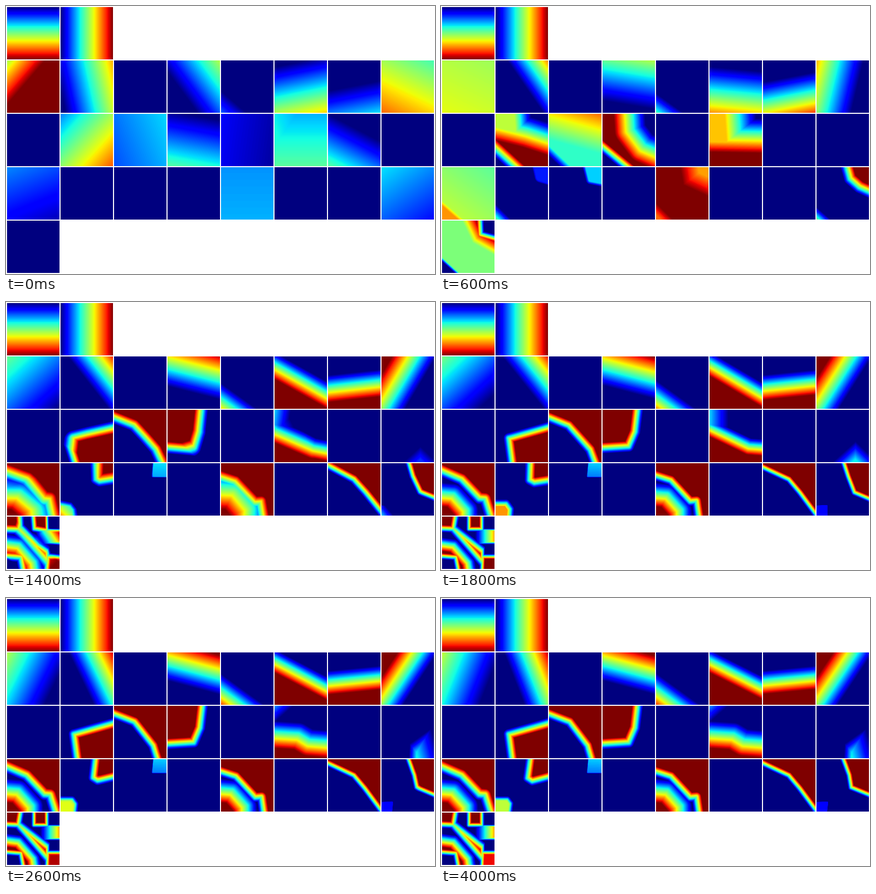
Recreate the animation shown at these times as a matplotlib script. Size 818x512 px, loop 4.2 s.

```python
import numpy as np
import matplotlib.pyplot as plt
from matplotlib.animation import FuncAnimation

WIDTH, HEIGHT, SIZE, GAP = 818, 512, 100, 2
FRAMES, INTERVAL = 21, 200
SETTLE = 3   # frames in which most of a change is done
X, Y = np.meshgrid(np.arange(SIZE) + .5, np.arange(SIZE) + .5)


# Fields give one unit's activation in percent; the colour map clips them.
def plane(top_left, top_right, bottom_left):
    return top_left + (top_right - top_left) * X / SIZE + (bottom_left - top_left) * Y / SIZE


def edge(width, *points):
    """Ramp of `width` pixels across a polyline, rising to the right of its direction."""
    path = np.array(points, float)
    for end, inner in ((0, 1), (-1, -2)):
        outward = path[end] - path[inner]
        path[end] += 300 * outward / np.hypot(*outward)
    best = np.full(X.shape, 1e9)
    signed = np.zeros(X.shape)
    for (x0, y0), (x1, y1) in zip(path, path[1:]):
        dx, dy = x1 - x0, y1 - y0
        length = np.hypot(dx, dy)
        t = np.clip(((X - x0) * dx + (Y - y0) * dy) / length ** 2, 0, 1)
        distance = np.hypot(X - x0 - t * dx, Y - y0 - t * dy)
        side = (dx * (Y - y0) - dy * (X - x0)) / length
        score = distance - 1e-3 * abs(side)   # settles ties at the corners
        signed = np.where(score < best, np.sign(side) * distance, signed)
        best = np.minimum(score, best)
    return np.clip(50 + 100 * signed / width, -60, 160)


def lowest(*fields):
    return np.min(np.broadcast_arrays(*fields), axis=0)


def highest(*fields):
    return np.max(np.broadcast_arrays(*fields), axis=0)


OFF = plane(-20, -20, -20)

# Each unit is a few poses by frame number; units without poses stay off.
units = {(0, 0): {0: plane(0, 0, 100)}, (0, 1): {0: plane(0, 100, 0)}}

# First hidden layer: one linear ramp per unit
units[1, 0] = {0: plane(55, 117, 108), 3: plane(57, 54, 63), 5: plane(43, 30, 28),
               9: plane(50, 22, 20), 20: plane(59, 6, 38)}
units[1, 1] = {0: plane(8, 73, -6), 3: plane(-22, 77, -90), 9: plane(-13, 90, -95),
               20: plane(-18, 95, -62)}
units[1, 3] = {0: plane(8, 57, -28), 3: plane(47, 57, -14), 20: plane(72, 108, -62)}
units[1, 4] = {0: plane(-30, -75, 22), 5: plane(-85, -180, 50), 20: plane(-56, -160, 87)}
units[1, 5] = {0: plane(-8, 5, 56), 3: plane(-10, -18, 76), 9: plane(20, -105, 232),
               20: plane(12, -102, 238)}
units[1, 6] = {0: plane(-33, -22, 24), 3: plane(-45, -24, 64), 20: plane(-78, -57, 145)}
units[1, 7] = {0: plane(55, 43, 80), 3: plane(72, -8, 53), 20: plane(142, 10, 54)}

# Second hidden layer: ramps bent where they cross the first layer's edges
units[2, 1] = {
    0: plane(25, 55, 52),
    3: lowest(highest(edge(60, (0, 20), (60, 35), (100, 48)),
                      lowest(58, edge(55, (40, 0), (43, 40)))),
              edge(26, (37, 100), (0, 66))),
    5: lowest(highest(edge(40, (0, 42), (50, 35), (100, 35)), plane(62, -12, 10)),
              edge(20, (17, 100), (0, 78))),
    9: edge(20, (31, 100), (25, 54), (100, 33)),
}
units[2, 2] = {
    0: plane(24, 34, 20),
    3: lowest(highest(plane(66, 80, 15), 41), edge(36, (46, 100), (0, 56))),
    5: edge(34, (94, 88), (62, 50), (40, 29), (0, 14)),
    9: edge(20, (87, 100), (78, 76), (37, 30), (0, 15)),
    20: edge(19, (80, 100), (73, 76), (39, 31), (0, 16)),
}
units[2, 3] = {
    0: lowest(plane(3, -5, 46), 44),
    3: lowest(edge(60, (51, 0), (53, 32), (77, 64), (100, 74)), edge(20, (45, 100), (0, 63))),
    5: lowest(edge(45, (55, 0), (53, 38), (62, 80)), edge(26, (45, 92), (0, 70))),
    9: edge(21, (67, 0), (62, 42), (50, 70), (0, 73)),
}
units[2, 4] = {0: plane(11, 4, 10), 3: OFF}
units[2, 5] = {
    0: highest(plane(36, 22, 42), plane(30, 30, 46)),
    3: highest(edge(66, (0, 40), (100, 42)), lowest(70, edge(85, (46, 0), (48, 30)))),
    5: highest(plane(34, -102, -15),
               lowest(plane(-25, -41, 74), edge(60, (24, 52), (84, 94)))),
    9: highest(plane(34, -60, 34), edge(32, (0, 34), (75, 70), (100, 72))),
    13: highest(plane(28, -50, -60), edge(52, (0, 55), (45, 58), (65, 70), (100, 73))),
}
units[2, 6] = {0: lowest(plane(0, -24, 46), 44), 3: OFF}
units[2, 7] = {
    0: OFF, 5: OFF,
    9: lowest(edge(70, (54, 126), (98, 86)), edge(70, (50, 85), (76, 110)), 36),
    13: lowest(edge(40, (72, 100), (74, 70)), edge(110, (42, 60), (56, 110)),
               edge(60, (60, 105), (95, 80))),
}


# Third hidden layer
def valley(width, *upper):
    return highest(edge(width, *upper), edge(46, (0, 60), (21, 62), (46, 90), (46, 100)))


units[3, 0] = {
    0: plane(26, 20, 11),
    3: highest(plane(52, 46, 60), lowest(75, edge(40, (0, 60), (46, 100)))),
    5: highest(plane(95, 76, 0), plane(22, 55, 84)),
    9: valley(23, (92, 100), (82, 68), (71, 67), (37, 31), (0, 15)),
}
units[3, 1] = {
    0: OFF,
    3: highest(lowest(15, edge(24, (100, 22), (86, 18), (82, 0))),
               edge(42, (-10, 90), (10, 110))),
    5: highest(lowest(38, edge(28, (100, 22), (76, 26), (70, 0))),
               edge(24, (0, 91), (9, 100))),
    9: highest(edge(20, (100, 33), (74, 37), (65, 32), (66, 0)),
               lowest(75, edge(18, (0, 78), (20, 78), (27, 88), (26, 100)))),
    20: highest(edge(18, (100, 34), (70, 42), (61, 36), (66, 0)),
                lowest(58, edge(15, (0, 78), (22, 78), (27, 85), (25, 100)))),
}
units[3, 2] = {
    0: OFF,
    3: lowest(33, edge(18, (100, 28), (79, 24), (73, 0))),
    5: lowest(38, edge(10, (100, 25), (76, 24), (74, 0))),
    9: lowest(plane(32, 33, 0), edge(4, (100, 25), (74, 25), (76, 0))),
}
units[3, 4] = {
    0: plane(27, 27, 30),
    3: lowest(highest(74, 50 + edge(130, (46, 0), (52, 34), (100, 56))),
              highest(80, 50 + edge(80, (32, 100), (0, 68)))),
    5: plane(108, 125, 76),
    9: valley(19, (81, 100), (77, 72), (65, 73), (28, 33), (0, 24)),
}
units[3, 6] = {
    0: OFF, 3: OFF,
    5: lowest(plane(42, 76, 62), edge(40, (100, 66), (55, 34), (22, 0))),
    9: edge(13, (98, 94), (70, 56), (49, 31), (0, 8)),
}
units[3, 7] = {
    0: plane(35, 26, 22),
    3: highest(edge(24, (100, 46), (82, 38), (64, 22), (58, 0)), plane(-160, -345, 50)),
    5: highest(edge(19, (100, 58), (80, 52), (58, 25), (53, 0)), plane(-272, -705, 78)),
    9: highest(edge(12, (100, 68), (72, 56), (60, 25), (52, 0)),
               lowest(11, edge(5, (0, 83), (19, 82), (19, 100)))),
    20: highest(edge(12, (100, 68), (66, 54), (62, 30), (51, 0)),
                lowest(12, edge(5, (0, 84), (20, 83), (18, 100)))),
}


# Output: a rough checkerboard, its middle squares joined by slanted stripes
def checkerboard(corner):
    return highest(
        edge(14, (26, 0), (22, 24), (0, 23)),
        edge(10, (76, 0), (76, 24), (51, 24), (51, 0)),
        lowest(edge(18, (32, 30), (76, 64)), edge(18, (72, 82), (34, 38)),
               edge(10, (77, 50), (77, 90))),
        lowest(edge(50, (88, 50), (88, 0)), edge(8, (100, 49), (0, 49)),
               edge(6, (0, 26), (100, 26))),
        lowest(edge(26, (0, 53), (22, 56), (50, 88), (52, 100)),
               edge(12, (30, 100), (26, 78), (0, 76))),
        lowest(corner, edge(10, (76, 100), (77, 76), (100, 76))))


units[4, 0] = {
    0: OFF,
    3: lowest(highest(50, edge(52, (100, 66), (58, 42), (38, 0))),
              edge(14, (73, 0), (74, 26), (100, 33)), edge(12, (33, 100), (0, 70))),
    5: lowest(highest(lowest(highest(52, plane(118, 118, -65), edge(60, (60, 100), (90, 70))),
                             edge(16, (22, 0), (56, 58), (100, 82))),
                      edge(24, (100, 54), (62, 36), (43, 0))),
              edge(6, (76, 0), (77, 24), (100, 26)), edge(14, (25, 100), (0, 75))),
    9: checkerboard(112),
    20: checkerboard(90),
}


def ease_out(elapsed, span):
    return (1 - np.exp(-elapsed / SETTLE)) / (1 - np.exp(-span / SETTLE))


def activation(poses, frame):
    before = max(k for k in poses if k <= frame)
    after = min((k for k in poses if k > frame), default=None)
    if after is None:
        return poses[before]
    t = ease_out(frame - before, after - before)
    return (1 - t) * poses[before] + t * poses[after]


def compose(frame):
    stage = np.full((HEIGHT, WIDTH), np.nan)
    for row, count in enumerate((2, 8, 8, 8, 1)):
        for col in range(count):
            x, y = (GAP + i * (SIZE + GAP) for i in (col, row))
            field = activation(units.get((row, col), {0: OFF}), frame)
            stage[y:y + SIZE, x:x + SIZE] = np.clip(field, 0, 100)
    return np.ma.masked_invalid(stage)


fig = plt.figure(figsize=(WIDTH / 100, HEIGHT / 100), dpi=100, facecolor="white")
ax = fig.add_axes([0, 0, 1, 1])
ax.axis("off")
picture = ax.imshow(compose(0), cmap="jet", vmin=0, vmax=100,
                    interpolation="nearest", aspect="auto")


def update(frame):
    picture.set_data(compose(frame))
    return [picture]


animation = FuncAnimation(fig, update, frames=FRAMES, interval=INTERVAL,
                          repeat=True, repeat_delay=0)
plt.show()
```
